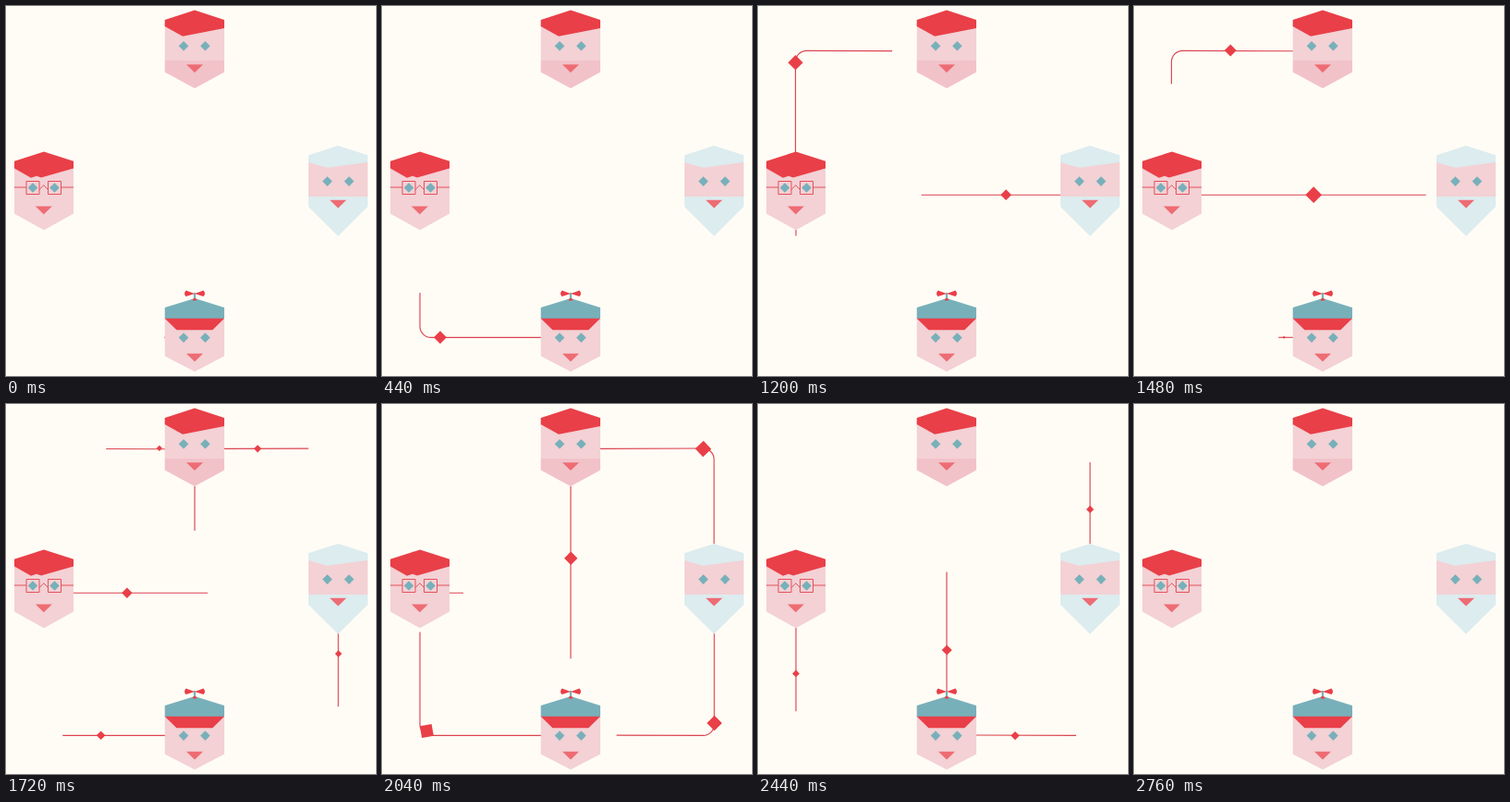
These frames come from a looping animation (400 by 400 pixels, 2.84 s). An HTML page:

```html
<!DOCTYPE html>
<html lang="en">
<head>
<meta charset="utf-8">
<title>Connected heads</title>
<style>
  html, body { margin: 0; width: 100%; height: 100%; overflow: hidden; background: #fffcf5; }
  svg { display: block; width: 100%; height: 100%; }
  .red { fill: #e93f48; }
  .skin { fill: #f3d1d5; }
  .chin { fill: #f2c2c9; }
  .teal { fill: #78b0ba; }
  .ice { fill: #dcecef; }
  .lip { fill: #ee6c73; }
  .wire { fill: none; stroke: #e4505a; stroke-width: 1; }
  .link { fill: none; stroke: #dc4450; stroke-width: 1.15; }
</style>
</head>
<body>
<svg viewBox="0 0 400 400">
  <defs>
    <path id="eye" class="teal" d="M0-5.3 5.3 0 0 5.3-5.3 0Z"/>
    <path id="mouth" class="lip" d="M-9 0H9L0 8.8Z"/>
  </defs>
  <g id="links"></g>

  <g id="top">
    <path class="skin" d="M171.7 18H236V60H171.7Z"/>
    <path class="chin" d="M171.7 59H236V71.5L204 89 171.7 71.5Z"/>
    <path class="red" d="M171.7 15 204 4.5 236 15V24L191 32.7 171.7 22Z"/>
    <use href="#eye" x="192" y="43.2"/><use href="#eye" x="215.4" y="43.2"/>
    <use href="#mouth" x="204" y="63.2"/>
  </g>

  <g id="left">
    <path class="skin" d="M9 170H73V224.5L41 242.3 9 224.5Z"/>
    <path class="red" d="M9 167.7 41 157.5 73 167.7V175.5L38 185.5 33 183.7 27 185.7 9 175.5Z"/>
    <use href="#eye" x="29" y="196.5"/><use href="#eye" x="52.5" y="196.5"/>
    <path class="wire" d="M22 189.5H36V203.5H22ZM45.5 189.5H59.5V203.5H45.5ZM9 196H22M59.5 196H73M36 198.5 40.8 193.8 45.5 198.5"/>
    <use href="#mouth" x="40.8" y="216.4"/>
  </g>

  <g id="right">
    <path class="skin" d="M327 165H391V207H327Z"/>
    <path class="ice" d="M327 161.3 359 151 391 161.3V169L347 174.8 327 169Z"/>
    <path class="ice" d="M327 206H391V217L359 248.8 327 217Z"/>
    <use href="#eye" x="347.4" y="189.6"/><use href="#eye" x="370.9" y="189.6"/>
    <use href="#mouth" x="359" y="209.8"/>
  </g>

  <g id="bottom">
    <path class="skin" d="M171.7 337H236V378.5L204 395.3 171.7 378.5Z"/>
    <path class="teal" d="M171.7 326 204 316 236 326V338H171.7Z"/>
    <path class="red" d="M171.7 337.7H236L223.3 350.3H184.4Z"/>
    <path class="teal" d="M202.9 310H205.1V318H202.9Z"/>
    <path class="red" d="M204 311 194.5 307.5Q191.5 311 194.5 314ZM204 311 213.5 307.5Q216.5 311 213.5 314ZM201.3 317.3 204 315.8 206.7 317.3 204 319Z"/>
    <use href="#eye" x="192" y="358.6"/><use href="#eye" x="215.4" y="358.6"/>
    <use href="#mouth" x="204" y="375.8"/>
  </g>
</svg>
<script>
const LOOP = 2840, STEP = 40;
const NS = 'http://www.w3.org/2000/svg';
const layer = document.getElementById('links');

// start: when the line leaves; grow: its draw time; gap, shrink: delay and time of its tail.
// pts, keys: stops of the diamond and their times after start.
const routes = [
  { d: 'M172 358.3H53A12 12 0 0 1 41 346.3V242', start: [0, 1440], grow: 612, gap: 638, shrink: 578,
    pts: [[172, 358.3], [53, 358.3], [41, 346], [41, 242]], keys: [0, 480, 790, 1190] },
  { d: 'M40.5 158V60.3A12 12 0 0 1 52.5 48.3L172 48.8', start: [690], grow: 576, gap: 610, shrink: 576,
    pts: [[40.5, 158], [40.5, 60.3], [53, 48.3], [172, 47.8]], keys: [79, 514, 590, 1054] },
  { d: 'M327 204.2H73', start: [830], grow: 625, gap: 622, shrink: 625,
    pts: [[327, 204.2], [73, 204.2]], keys: [147, 1109] },
  { d: 'M236 48.4 347 48A12 12 0 0 1 359 60V151', start: [1498], grow: 539, gap: 618, shrink: 539,
    pts: [[236, 48.3], [347, 48.3], [359, 60], [359, 151]], keys: [70, 538, 715, 1098] },
  { d: 'M359.2 248V346.4A12 12 0 0 1 347.2 358.4L236 358', start: [1527], grow: 556, gap: 620, shrink: 556,
    pts: [[359.4, 248], [359.4, 346], [347, 358.6], [236, 358.6]], keys: [99, 517, 637, 1081] },
  { d: 'M204 89V318', start: [1609], grow: 530, gap: 617, shrink: 530,
    pts: [[204.2, 89], [204.2, 318]], keys: [117, 1041] }
];

const clamp = x => Math.max(0, Math.min(1, x));

function add(cls, d) {
  const el = document.createElementNS(NS, 'path');
  el.setAttribute('class', cls);
  el.setAttribute('d', d);
  layer.appendChild(el);
  return el;
}

for (const r of routes) {
  r.line = add('link', r.d);
  r.gem = add('red', 'M0-1 1 0 0 1-1 0Z');
  r.len = r.line.getTotalLength();
}

function show(el, on) {
  el.setAttribute('visibility', on ? 'visible' : 'hidden');
}

function drawLine(r, t) {
  const head = r.len * clamp(t / r.grow);
  const tail = r.len * clamp((t - r.gap) / r.shrink);
  show(r.line, head - tail > 0.01);
  r.line.setAttribute('stroke-dasharray', `0 ${tail} ${head - tail} ${r.len + 10}`);
}

function drawGem(r, t) {
  const { keys, pts } = r, last = keys.length - 1;
  const on = t >= keys[0] && t < keys[last];
  show(r.gem, on);
  if (!on) return;
  let i = 0;
  while (t >= keys[i + 1]) i++;
  const k = (t - keys[i]) / (keys[i + 1] - keys[i]);
  const [x, y] = pts[i].map((v, j) => v + (pts[i + 1][j] - v) * k);
  const turn = last === 3 && i === 1 ? 90 * k : 0;
  const u = t / (r.gap + r.shrink);
  const size = 1 + 16.5 * Math.max(0, Math.min(u, 1 - u));
  r.gem.setAttribute('transform', `translate(${x} ${y}) rotate(${turn}) scale(${size})`);
}

function draw(ms) {
  const now = Math.floor((ms % LOOP) / STEP) * STEP;
  for (const r of routes) {
    const begin = r.start.filter(s => s <= now).pop();
    const t = begin === undefined ? -1 : now - begin;
    drawLine(r, t);
    drawGem(r, t);
  }
}

const origin = performance.now();
function tick() {
  draw(performance.now() - origin);
  requestAnimationFrame(tick);
}
tick();
</script>
</body>
</html>
```
